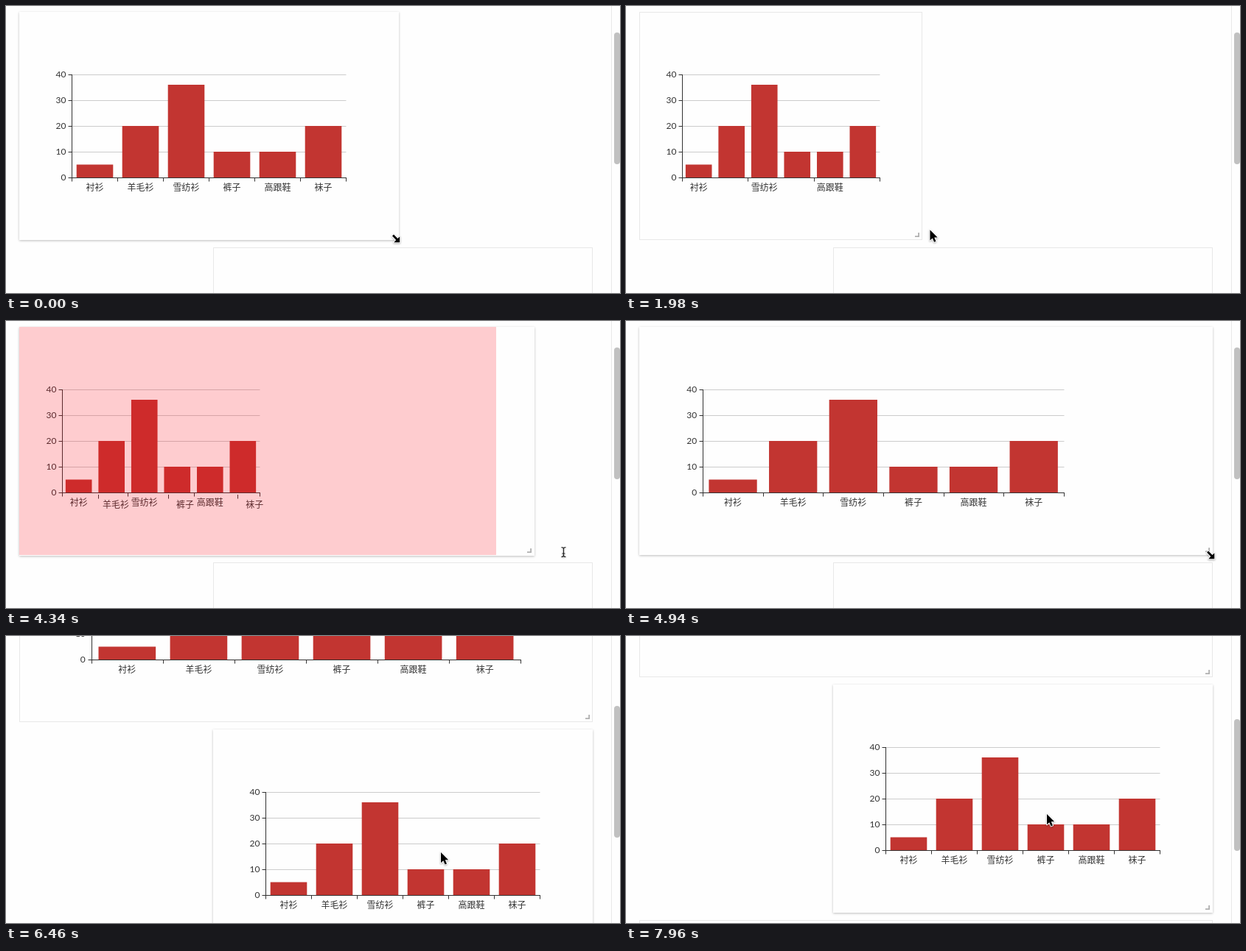
An HTML page that plays this animation: 833 px wide and 390 px high, repeating every 8 s.

```html
<!DOCTYPE html>
<html lang="zh">
<head>
<meta charset="utf-8">
<title>Resizable chart cards</title>
<style>
  html, body { margin: 0; width: 100%; height: 100%; overflow: hidden; background: #fefefe; }
  #stage { position: absolute; left: 0; top: 0; width: 833px; height: 390px; overflow: hidden; }
  #page { position: absolute; left: 0; top: 0; }
  .card { position: absolute; box-sizing: border-box; border: 1px solid #e8e8e8; background: #fefefe; }
  .card.hover { border-color: transparent; box-shadow: 0 1px 3px rgba(0, 0, 0, .26); }
  .chart { position: absolute; left: 24px; top: 24px; overflow: hidden; }
  .grip { position: absolute; right: 3px; bottom: 3px; width: 6px; height: 6px; opacity: .302; display: block; }
  #slot { position: absolute; left: 18px; top: 8px; height: 310px; background: rgba(255, 9, 24, .2); }
  #rail { position: absolute; left: 821px; top: 0; width: 11px; height: 390px; border-left: 1px solid #e8e8e8; }
  #thumb { position: absolute; left: 825px; width: 8px; height: 179px; border-radius: 4px; background: #c1c1c1; }
  #pointer { position: absolute; left: 0; top: 0; overflow: visible; filter: drop-shadow(0 1px 1px rgba(0, 0, 0, .3)); }
  #pointer path { fill: #000; stroke: #fff; stroke-width: 2; paint-order: stroke; stroke-linejoin: round; }
  #pointer path.beam { fill: none; stroke: #222; stroke-width: 1.2; }
  text { font: 12px Lato, "Noto Sans CJK SC", "Noto Sans CJK", sans-serif; fill: #333; }
</style>
</head>
<body>
<div id="stage">
  <div id="page"></div>
  <div id="rail"></div>
  <div id="thumb"></div>
  <svg id="pointer" width="1" height="1"><path></path></svg>
</div>
<script>
const LOOP = 8000, STEP = 147.5;
const NAMES = ["衬衫", "羊毛衫", "雪纺衫", "裤子", "高跟鞋", "袜子"];
const VALUES = [5, 20, 36, 10, 10, 20];
const BASE = 200;              // chart baseline inside its canvas
const HEIGHT = 310, FULL = 515, COLUMN = 131.5;

// Bursts of steady updates: start time, number of updates
const BURSTS = [[0, 1], [150, 4], [800, 3], [1240, 30], [6010, 1], [6310, 2], [7060, 7]];
const TICKS = BURSTS.flatMap(([start, n]) => Array.from({ length: n }, (_, i) => start + i * STEP));

// The hand: time, x, y
const POINTER = [
  [0, 524, 310], [150, 517, 309], [950, 441, 258], [1530, 392, 308], [1970, 413, 304],
  [2270, 392, 313], [3460, 690, 314], [4110, 707, 314], [4340, 757, 314], [4640, 790, 314],
  [4940, 788, 312], [5530, 590, 294], [7360, 590, 294], [7940, 571, 242]
];
const LAG = 230;               // a dragged corner trails the hand
const DRAGS = [{ from: 150, to: 1530, width: FULL }, { from: 2270, to: 4780, width: columns(-1) }];
const PATHS = {
  arrow: "M0 0V14.2L3.3 11.2L5.6 16.4L8 15.4L5.8 10.3H10.2Z",
  resize: "M0 2.5L2 .5L7.4 5.9L10.2 3.2V11.2H2.2L5.2 8Z",
  beam: "M-3 -6.5Q0 -6.5 0 -4.5V4.5Q0 6.5 -3 6.5M3 -6.5Q0 -6.5 0 -4.5M3 6.5Q0 6.5 0 4.5M-2 2H2"
};

const $ = id => document.getElementById(id);
const within = (t, a, b) => t >= a && t < b;
const easeIn = p => p * p;
const easeOut = p => 1 - (1 - p) ** 3;
const smooth = p => p * p * (3 - 2 * p);
const tween = (t, from, to, ease) => ease(Math.min(1, Math.max(0, (t - from) / (to - from))));

function columns(n) { return Math.round(FULL + n * COLUMN); }
const nearest = w => columns(Math.round((w - FULL) / COLUMN));
const SMALL = columns(-1), WIDE = columns(2);

function hand(t) {
  const i = POINTER.findIndex(key => key[0] > t);
  if (i < 0) return POINTER[POINTER.length - 1].slice(1);
  const [t0, x0, y0] = POINTER[i - 1], [t1, x1, y1] = POINTER[i];
  const p = (t - t0) / (t1 - t0);
  return [x0 + (x1 - x0) * p, y0 + (y1 - y0) * p];
}

function cardSize(t, drag) {
  if (!drag) return [t < 150 ? FULL : t < 2270 ? SMALL : WIDE, HEIGHT];
  const [px, py] = hand(drag.from), [x, y] = hand(Math.max(drag.from, t - LAG));
  return [Math.round(drag.width + x - px), Math.round(HEIGHT + y - py)];
}

const chartWidth = t =>
  FULL + (SMALL - FULL) * tween(t, 1530, 1830, easeOut) + (WIDE - SMALL) * tween(t, 4780, 5220, easeOut);

const scrollTop = t =>
  Math.round(203 * tween(t, 5860, 6460, easeIn) + 59 * tween(t, 6960, 7960, smooth));

function pointerShape(t, dragging) {
  if (within(t, 2710, 4780)) return "beam";
  return dragging || t < 1530 || within(t, 4780, 5000) ? "resize" : "arrow";
}

const snap = x => Math.round(x - .01) + .5;
const line = (x1, y1, x2, y2, color = "#333") =>
  `<path d="M${x1} ${y1}L${x2} ${y2}" stroke="${color}"/>`;
const label = (x, y, s, anchor) => `<text x="${x}" y="${y}" text-anchor="${anchor}">${s}</text>`;

function axis(cardW) {
  const canvas = cardW - 50;
  return { left: canvas * .1, step: canvas * .8 / 6 };
}

function category({ left, step }, i, dy = 0) {
  const x = snap(left + i * step), y = BASE + dy;
  return line(x, y, x, y + 5.5) + label(left + (i + .5) * step, y + 18, NAMES[i], "middle");
}

function chart(cardW, leftovers) {
  const a = axis(cardW), x0 = snap(a.left), x1 = snap(a.left + a.step * 6);
  const every = cardW < 405 ? 2 : 1;
  let out = "";
  for (let v = 0; v <= 40; v += 10) {
    const y = BASE - v * 3.5;
    if (v) out += line(x0, y + .5, x1, y + .5, "#ccc");
    out += line(x0 - 5, y + .5, x0, y + .5) + label(a.left - 8, y + 4, v, "end");
  }
  VALUES.forEach((v, i) => {
    out += `<rect x="${a.left + (i + .1) * a.step}" y="${BASE - v * 3.5}" width="${a.step * .8}" height="${v * 3.5}" fill="#c23531"/>`;
  });
  out += line(x0, 60, x0, BASE + 1) + line(x0 - .5, BASE + .5, x1 + .5, BASE + .5) + line(x1, BASE, x1, BASE + 5.5);
  for (let i = 0; i < 6; i += every) out += category(a, i);
  // Dropped labels stay stuck late in their shrink
  const stuck = axis(SMALL + .146 * (FULL - SMALL));
  if (leftovers) for (let i = 1; i < 6; i += 2) out += category(stuck, i, 3);
  return out;
}

function makeCard(x, y, w) {
  const el = document.createElement("div");
  el.className = "card";
  el.style.left = x + "px";
  el.style.top = y + "px";
  el.innerHTML = '<svg class="chart"></svg><svg class="grip"><path d="M6 6H0V4.2H4.2V0H6Z"/></svg>';
  $("page").append(el);
  const svg = el.firstChild, grip = el.lastChild;
  const card = {
    size(w, h) {
      el.style.width = w + "px";
      el.style.height = h + "px";
      svg.setAttribute("width", w - 50);
      svg.setAttribute("height", h - 50);
    },
    draw(w, leftovers) { svg.innerHTML = chart(w, leftovers); },
    hover(on) { el.classList.toggle("hover", on); },
    grip(on) { grip.style.display = on ? "block" : "none"; }
  };
  card.size(w, HEIGHT);
  card.draw(w, false);
  return card;
}

const first = makeCard(18, 8, FULL);
const second = makeCard(281, 328, FULL);
makeCard(18, 648, WIDE);
const slot = document.createElement("div");
slot.id = "slot";
$("page").append(slot);

function render(t) {
  const drag = DRAGS.find(d => within(t, d.from, d.to));
  const [w, h] = cardSize(t, drag), scroll = scrollTop(t);
  first.size(w, h);
  first.draw(chartWidth(t), drag === DRAGS[1]);
  first.hover(t < 150 || within(t, 2270, 6310));
  first.grip(t >= 150);
  second.hover(t >= 6310);

  slot.style.display = drag ? "block" : "none";
  slot.style.width = nearest(w) + "px";

  $("page").style.top = -scroll + "px";
  $("thumb").style.top = Math.round(36 + scroll * .295) + "px";

  const shape = pointerShape(t, drag), path = $("pointer").firstChild;
  path.setAttribute("d", PATHS[shape]);
  path.setAttribute("class", shape);
  path.setAttribute("transform", `translate(${hand(t)})`);
}

let shown = -1;
function frame() {
  const now = performance.now() % LOOP;
  const t = TICKS.filter(tick => tick <= now).pop();
  if (t !== shown) render(shown = t);
  requestAnimationFrame(frame);
}
frame();
</script>
</body>
</html>
```
